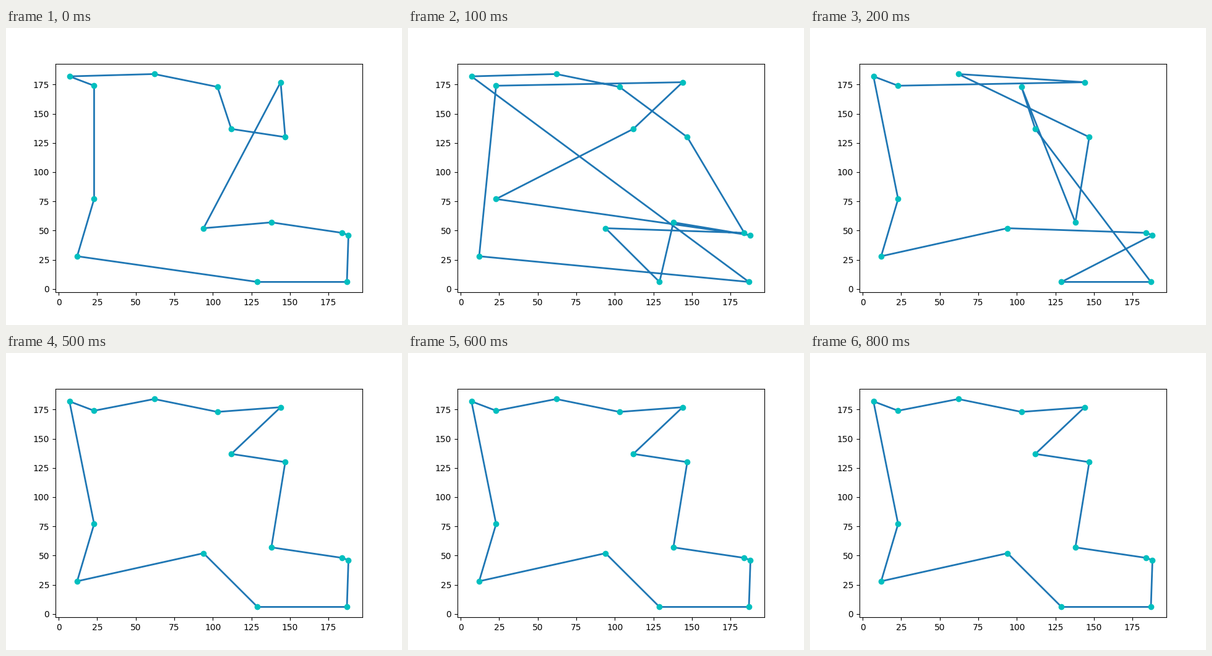
A matplotlib script for the animation above (1400 ms loop, 640 by 480 pixels).

```python
import matplotlib.pyplot as plt
from matplotlib.animation import FuncAnimation

STEP_MS = 100
STEPS = 14

CITIES = {
    "A": (7, 182), "B": (23, 174), "C": (62, 184), "D": (103, 173),
    "E": (144, 177), "F": (112, 137), "G": (147, 130), "H": (138, 57),
    "I": (184, 48), "J": (188, 46), "K": (187, 6), "L": (129, 6),
    "M": (94, 52), "N": (12, 28), "O": (23, 77),
}

# Closed tours tried in turn; the last one is held until the loop restarts.
TOURS = [
    "ACDFGEMHIJKLNOB",
    "ACDGIMLHJOFEBNK",
    "ABECGHDFKLJIMNO",
    "ABCDEFGHIJKLMNO",
]


def tour_path(tour):
    return zip(*(CITIES[name] for name in tour + tour[0]))


fig, ax = plt.subplots(figsize=(6.4, 4.8), dpi=100)
route, = ax.plot(*tour_path(TOURS[0]), color="tab:blue", lw=2)
ax.plot(*zip(*CITIES.values()), "co")


def update(step):
    tour = TOURS[min(step, len(TOURS) - 1)]
    route.set_data(*map(list, tour_path(tour)))
    return route,


anim = FuncAnimation(fig, update, frames=STEPS, interval=STEP_MS,
                     repeat=True, repeat_delay=0)
plt.show()
```
